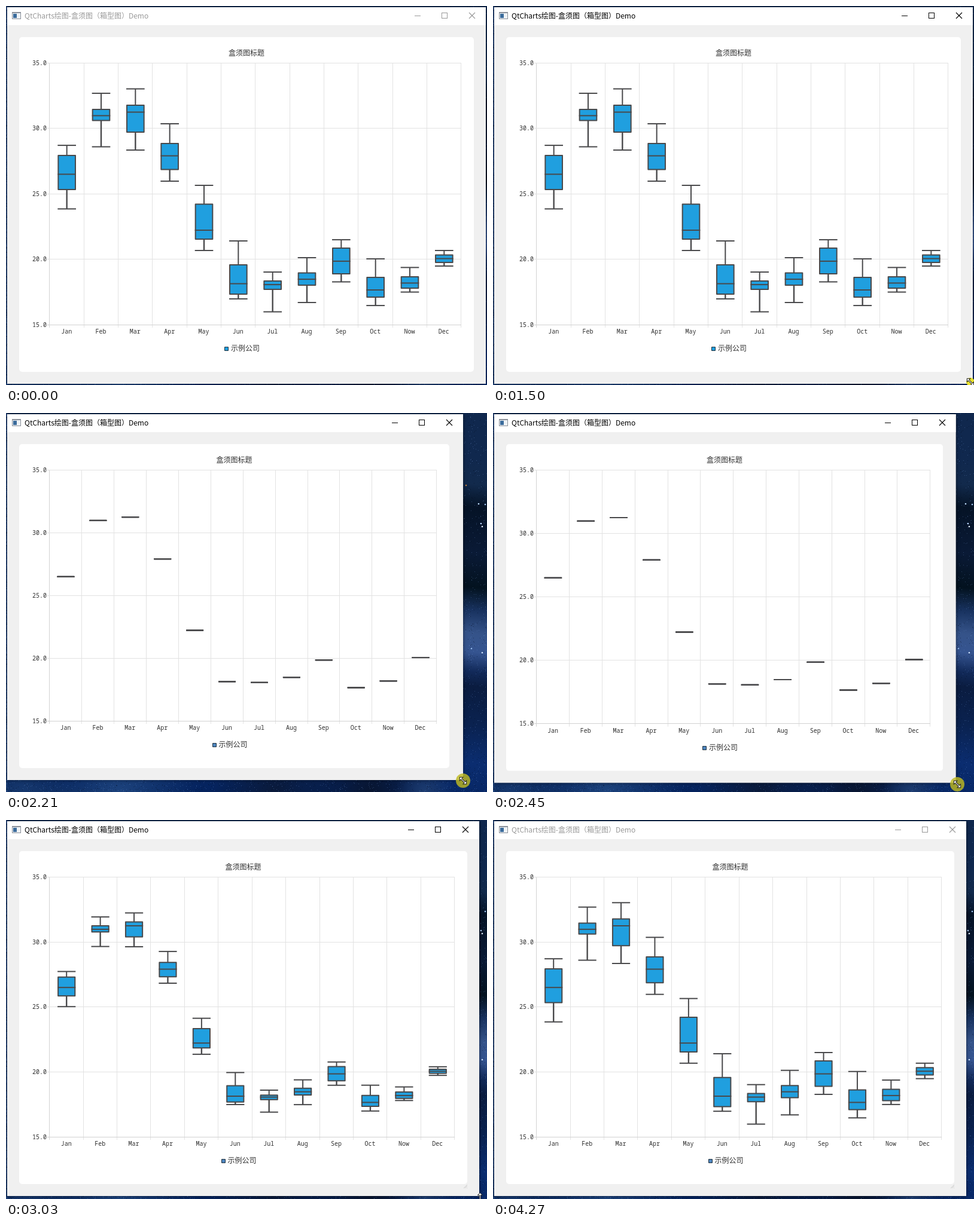
Write an HTML page with a canvas that moves like this. It is 804 px wide and 634 px high and loops after 4340 ms.

```html
<!DOCTYPE html>
<html lang="zh">
<head>
<meta charset="utf-8">
<style>
  html, body { margin: 0; width: 100%; height: 100%; overflow: hidden; background: #0a1c40; }
  canvas { display: block; }
</style>
</head>
<body>
<canvas id="stage" width="804" height="634"></canvas>
<script>
const LOOP = 4340, W = 804, H = 634;
const ctx = document.getElementById('stage').getContext('2d');
const CJK = '12px "Noto Sans CJK SC", "Noto Sans CJK", sans-serif';
const MONO = '10px "Noto Sans Mono", monospace';
const PEN = '#49494b', BLUE = '#209fdf';

// upper whisker, upper quartile, median, lower quartile, lower whisker
const boxes = {
  Jan: [28.71, 27.94, 26.5, 25.33, 23.85],
  Feb: [32.69, 31.46, 30.98, 30.61, 28.6],
  Mar: [33.03, 31.78, 31.25, 29.72, 28.35],
  Apr: [30.36, 28.85, 27.91, 26.86, 25.97],
  May: [25.65, 24.21, 22.22, 21.54, 20.67],
  Jun: [21.4, 19.57, 18.13, 17.33, 16.97],
  Jul: [19.02, 18.34, 18.06, 17.7, 15.98],
  Aug: [20.12, 18.95, 18.47, 18.02, 16.69],
  Sep: [21.49, 20.85, 19.85, 18.89, 18.27],
  Oct: [20.03, 18.61, 17.65, 17.1, 16.46],
  Now: [19.37, 18.66, 18.18, 17.79, 17.49],
  Dec: [20.67, 20.33, 20.05, 19.76, 19.48]
};

// [time, x, y]: bottom right corner of the window, of the chart panel, and the pointer
const windowPath = [[1620, 802, 632], [1690, 797, 630], [1750, 784, 625], [1810, 764, 617],
  [1880, 764, 617], [1960, 754, 611], [2090, 754, 610], [2210, 764, 614], [2280, 764, 614],
  [2650, 785, 624], [2710, 785, 624], [2850, 791, 629]];
const panelPath = [[1620, 782, 612], [1750, 777, 610], [1810, 764, 605], [1880, 764, 605],
  [1960, 742, 596], [2090, 734, 590], [2210, 741, 594], [2280, 741, 594],
  [2650, 765, 604], [2710, 765, 604], [2850, 771, 609]];
const pointerPath = [[230, 734, 626], [740, 798, 628], [1620, 798, 629], [1810, 762, 616],
  [1880, 762, 616], [1960, 748, 608], [2090, 752, 608], [2210, 764, 615], [2280, 764, 615],
  [2650, 790, 628], [2710, 790, 628], [2850, 793, 631], [3400, 791, 633], [3480, 791, 633],
  [3730, 796, 640]];

function along(path, t) {
  const i = path.findIndex(k => k[0] > t);
  if (i === 0) return path[0].slice(1);
  if (i < 0) return path[path.length - 1].slice(1);
  const [a, b] = [path[i - 1], path[i]], p = (t - a[0]) / (b[0] - a[0]);
  return [a[1] + (b[1] - a[1]) * p, a[2] + (b[2] - a[2]) * p];
}

function line(x1, y1, x2, y2, color, width = 1) {
  ctx.strokeStyle = color;
  ctx.lineWidth = width;
  ctx.beginPath();
  ctx.moveTo(x1, y1);
  ctx.lineTo(x2, y2);
  ctx.stroke();
}

function text(str, x, y, font, color, align = 'left') {
  ctx.font = font;
  ctx.fillStyle = color;
  ctx.textAlign = align;
  ctx.fillText(str, x, y);
}

function makeWallpaper() {
  const canvas = document.createElement('canvas');
  canvas.width = W;
  canvas.height = H;
  const g = canvas.getContext('2d');
  let seed = 7;
  const random = () => (seed = seed * 16807 % 2147483647) / 2147483647;
  const sky = g.createLinearGradient(0, 0, -60, H);
  const stops = [[0, '#10284e'], [.07, '#122a4c'], [.13, '#051326'], [.25, '#0a1a36'],
    [.34, '#03121f'], [.4, '#18325f'], [.46, '#355389'], [.51, '#355490'], [.56, '#122a5a'],
    [.6, '#0a1c40'], [.7, '#0a2250'], [.8, '#0b2d70'], [.95, '#04225c'], [1, '#0a2450']];
  stops.forEach(s => sky.addColorStop(...s));
  g.fillStyle = sky;
  g.fillRect(0, 0, W, H);
  g.fillStyle = '#2c4a7c';
  g.fillRect(0, 0, 2, H);
  for (const [x, r, color] of [[30, 90, '#16386e'], [190, 130, '#1c427c'], [450, 110, '#0a1a3a'],
    [610, 120, '#081530'], [700, 50, '#1d3c70']]) {
    const glow = g.createRadialGradient(x, 634, 0, x, 634, r);
    glow.addColorStop(0, color);
    glow.addColorStop(1, color + '00');
    g.fillStyle = glow;
    g.fillRect(0, 600, W, 34);
  }
  for (let i = 0; i < 2600; i++) {
    const edge = random();
    const x = edge < .4 ? 740 + random() * 64 : edge < .55 ? random() * 2 : random() * W;
    const y = edge < .55 ? random() * H : 600 + random() * 34;
    g.fillStyle = random() < .5 ? 'rgba(120,160,220,.3)' : 'rgba(0,8,25,.4)';
    g.fillRect(Math.floor(x), Math.floor(y), 1, 1);
  }
  for (const [x, y, color] of [[790, 152, '#bfe0ff'], [801, 153, '#9fc4f0'], [794, 185, '#bcd8ff'],
    [796, 190, '#e6f2ff'], [769, 121, '#c08040'], [778, 394, '#8fb4e8'], [796, 401, '#d0e6ff']]) {
    g.fillStyle = color;
    g.beginPath();
    g.arc(x, y, 1.3, 0, 7);
    g.fill();
  }
  return canvas;
}

function drawTitleBar(right, active) {
  const ink = active ? '#000' : '#999';
  ctx.fillStyle = '#fff';
  ctx.fillRect(2, 2, right - 2, 30);
  ctx.fillStyle = '#8a9099';
  ctx.fillRect(10, 10, 15, 12);
  ctx.fillStyle = '#eef2f6';
  ctx.fillRect(11, 12, 13, 9);
  ctx.fillStyle = '#3c6c9c';
  ctx.fillRect(12, 13, 6, 7);
  text('QtCharts绘图-盒须图（箱型图）Demo', 31, 21, CJK, ink);
  const x = Math.round(right);
  line(x - 119, 16.5, x - 109, 16.5, ink);
  ctx.strokeRect(x - 73.5, 11.5, 9, 9);
  line(x - 28, 11, x - 18, 21, ink, 1.1);
  line(x - 18, 11, x - 28, 21, ink, 1.1);
}

function drawBox(values, cx, width, toY, grow) {
  const median = values[2];
  const [top, q3, mid, q1, low] = values.map(v => toY(median + (v - median) * grow));
  const l = cx - width / 2, r = cx + width / 2;
  line(cx, top, cx, q3, PEN, 2);
  line(cx, q1, cx, low, PEN, 2.4);
  ctx.fillStyle = BLUE;
  ctx.fillRect(l, q3, width, q1 - q3);
  ctx.lineWidth = 2;
  ctx.lineJoin = 'round';
  ctx.strokeRect(l, q3, width, q1 - q3);
  for (const y of [top, mid, low]) line(l - 1, y, r + 1, y, PEN, 2);
}

function drawChart(right, bottom, grow, resized) {
  const x0 = 73, y0 = 95.5, x1 = right - 21, y1 = bottom - 79;
  const center = (22 + right) / 2, step = (x1 - x0) / 12;
  const toY = v => y1 - (v - 15) / 20 * (y1 - y0);
  const crisp = v => Math.floor(v) + .5;

  ctx.fillStyle = '#fff';
  ctx.beginPath();
  ctx.roundRect(22, 52, right - 22, bottom - 52, 5);
  ctx.fill();
  text('盒须图标题', center, 83, CJK, '#303030', 'center');

  for (let i = 0; i <= 12; i++) {
    const x = crisp(x0 + i * step - .3);
    line(x, y0, x, y1 + 5, i ? '#e2e2e2' : '#d2d2d2');
  }
  for (let v = 15; v <= 35; v += 5) {
    const y = crisp(toY(v));
    line(x0 - 4, y, x1, y, v > 15 ? '#e2e2e2' : '#d2d2d2');
    text(v.toFixed(1), 68, y + 3.5, MONO, '#303030', 'right');
  }
  Object.entries(boxes).forEach(([month, values], i) => {
    const cx = x0 + (i + .5) * step;
    text(month, cx - .5, y1 + 15, MONO, '#303030', 'center');
    drawBox(values, cx, step / 2, toY, grow);
  });

  ctx.fillStyle = resized ? '#4f86c0' : BLUE;
  ctx.strokeStyle = '#20303c';
  ctx.lineWidth = 1;
  const mx = Math.round(center - 37) + .5, my = Math.round(bottom - 42) + .5;
  ctx.fillRect(mx, my, 6, 6);
  ctx.strokeRect(mx, my, 6, 6);
  text('示例公司', center - 26, bottom - 35, CJK, '#303030');
}

function drawPointer(t) {
  if (t < 230 || t >= 3730) return;
  const [x, y] = along(pointerPath, t);
  if (t >= 1500 && t < 2850) {
    ctx.fillStyle = t < 1620 ? '#e8e02c' : 'rgba(190,186,34,.82)';
    ctx.beginPath();
    ctx.arc(x, y, t < 1620 ? 7 : 12, 0, 7);
    ctx.fill();
  }
  ctx.save();
  ctx.translate(x, y);
  const arrow = t < 810;
  const shape = arrow
    ? 'M0 0V16L4 12.5L6.5 18L9 17L6.5 11.5H11.5Z'
    : 'M0 -8L4 -4H1V4H4L0 8L-4 4H-1V-4H-4Z';
  if (!arrow && t < 2850) ctx.rotate(-Math.PI / 4);
  const path = new Path2D(shape);
  ctx.fillStyle = '#fff';
  ctx.strokeStyle = '#222';
  ctx.lineWidth = 1;
  ctx.fill(path);
  ctx.stroke(path);
  ctx.restore();
}

const wallpaper = makeWallpaper();

function draw(t) {
  const [right, bottom] = along(windowPath, t);
  const left = 1 - Math.min(1, Math.max(0, (t - 2847) / 1000));
  const grow = t < 1620 ? 1 : 1 - left ** 4;

  ctx.drawImage(wallpaper, 0, 0);
  ctx.save();
  ctx.shadowColor = 'rgba(0,0,0,.5)';
  ctx.shadowBlur = 6;
  ctx.fillStyle = '#f0f0f0';
  ctx.fillRect(2, 2, right - 2, bottom - 2);
  ctx.restore();

  ctx.save();
  ctx.beginPath();
  ctx.rect(2, 2, right - 2, bottom - 2);
  ctx.clip();
  drawTitleBar(right, t >= 1500 && t < 4270);
  drawChart(...along(panelPath, t), grow, t >= 1620);
  if (t >= 2460) {
    for (const d of [1, 4, 6]) line(771 - d, 616, 771, 616 - d, '#cfcfcf');
  }
  ctx.restore();
  drawPointer(t);
}

function frame() {
  draw(performance.now() % LOOP);
  requestAnimationFrame(frame);
}
frame();
</script>
</body>
</html>
```
